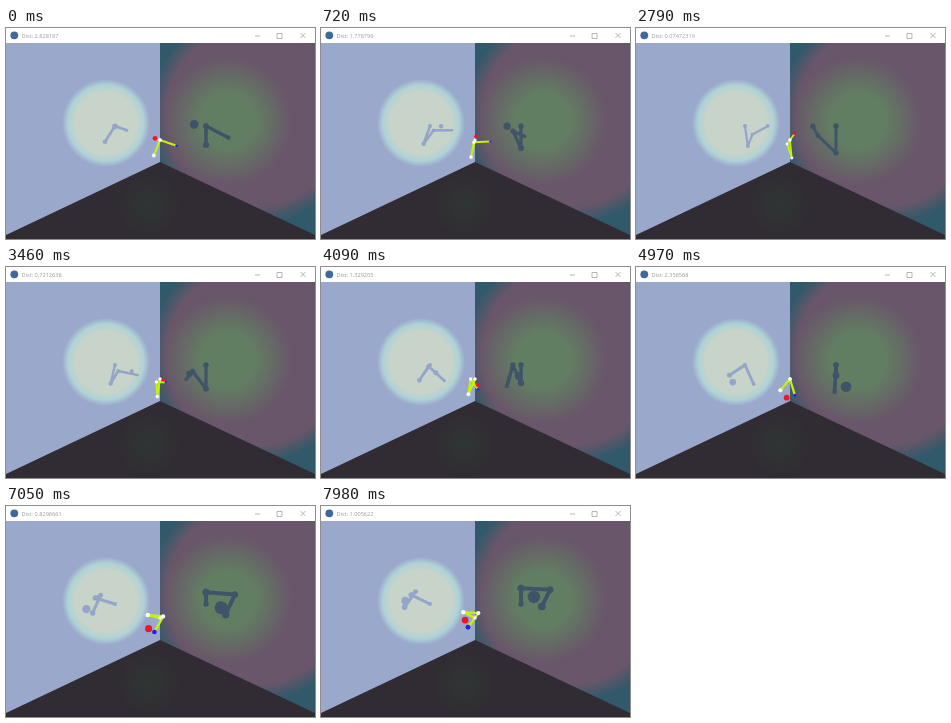
An HTML page for the animation above (8000 ms loop, 309 by 211 pixels).

```html
<!DOCTYPE html>
<html lang="en">
<head>
<meta charset="utf-8">
<title>Arm reaching a target</title>
<style>
  html, body { margin: 0; width: 100%; height: 100%; overflow: hidden; background: #fff; }
  svg { display: block; width: 100vw; height: 100vh; }
  text { font: 5.6px "Open Sans", sans-serif; fill: #999; }
  polyline { fill: none; stroke-linejoin: round; }
</style>
</head>
<body>
<svg viewBox="0 0 309 211">
  <defs>
    <radialGradient id="spot" gradientUnits="userSpaceOnUse" cx="100" cy="95" r="44">
      <stop offset=".7" stop-color="#c8d3ca"/>
      <stop offset=".86" stop-color="#aed3d5"/>
      <stop offset="1" stop-color="#9aa8cc"/>
    </radialGradient>
    <radialGradient id="mauve" gradientUnits="userSpaceOnUse" cx="250" cy="88" r="112">
      <stop offset=".8" stop-color="#69566a"/>
      <stop offset=".96" stop-color="#30596a"/>
    </radialGradient>
    <radialGradient id="green" gradientUnits="userSpaceOnUse" cx="222" cy="93" r="64">
      <stop offset=".42" stop-color="#627e62"/>
      <stop offset="1" stop-color="#627e62" stop-opacity="0"/>
    </radialGradient>
    <radialGradient id="glow" gradientUnits="userSpaceOnUse" cx="143" cy="177" r="34">
      <stop offset="0" stop-color="#2f3632"/>
      <stop offset="1" stop-color="#312b34"/>
    </radialGradient>
  </defs>
  <path fill="url(#spot)" d="M0 15H154V211H0z"/>
  <path fill="url(#mauve)" d="M154 15H309V211H154z"/>
  <path fill="url(#green)" d="M154 15H309V211H154z"/>
  <path fill="url(#glow)" d="M0 207L154 134L309 207V211H0z"/>
  <g id="scene"></g>
  <path fill="#fff" d="M0 0H309V15H0z"/>
  <circle cx="8.3" cy="7.3" r="3.9" fill="#3f689c"/>
  <text id="dist" x="15.5" y="9.7"></text>
  <path fill="none" stroke="#999" stroke-width=".7"
    d="M249 8H254M271 5.5h5v5h-5zM294.5 5l5 5m0-5l-5 5"/>
</svg>
<script>
const LOOP = 8000;
const HOLDS = [[780, 870], [1620, 1710], [3240, 3360]];

// Key angles in degrees: yaw turns from the left wall to the right, pitch is downward.
const keyTimes = [0, 1530, 2790, 4090, 4970, 6110, 7980];
const distance = [2.828187, 0.5982321, 0.07472319, 1.329205, 2.358568, 0.6518182, 1.005622];
const bones = [
  { yaw: [180, 180, 180, 180, 180, 180, 180], pitch: [60, 84, 98, 58, 39, 0, -19] },
  { yaw: [0, -60, -69, -31, 0, 72, 77], pitch: [-60, -50, -50, -58, -39, 6, 3] },
  { yaw: [52, -9, -12, -14, -6, 48, 27], pitch: [19, -26, -36, 35, 64, 112, 128] }
];
const reach = { yaw: [-117, -150, -180, -223, -200, -227, -82], pitch: [-18, -20, -20, -23, 7, 0, -56] };

// Each view projects a point: left and right run along the walls, down is vertical.
const shadow = (color, width, joint, ball, project) =>
  ({ line: color, width, joint, ball, project, dots: Array(5).fill(color) });
const views = [
  shadow("#94a5c8", 2.3, 2, 2.8, ([left, right, down]) =>
    [109 + left, 98 + 1.1 * down + .14 * left - .17 * right]),
  shadow("#3f5468", 3, 2.7, 4.4, ([left, right, down]) =>
    [200 + right, 98 + 1.45 * down + .38 * left - .06 * right]),
  { line: "#c4f20a", width: 1.8, joint: 1.7, ball: 2.4,
    dots: ["#fff", "#fff", "#fff", "#2222e8", "#f0142c"],
    project: ([left, right, down]) => [154 + .62 * left + .42 * right, 112 + down] }
];

const add = (name, attributes) => {
  const node = document.createElementNS("http://www.w3.org/2000/svg", name);
  set(node, attributes);
  return document.getElementById("scene").appendChild(node);
};
const set = (node, attributes) => {
  for (const key in attributes) node.setAttribute(key, attributes[key]);
};
for (const view of views) {
  view.path = add("polyline", { stroke: view.line });
  view.circles = view.dots.map(fill => add("circle", { fill }));
}

function sample(track, time) {
  const next = Math.max(1, keyTimes.findIndex(key => key >= time));
  const from = keyTimes[next - 1], to = keyTimes[next];
  return track[next - 1] + (track[next] - track[next - 1]) * (time - from) / (to - from);
}

function extend([left, right, down], bone, length, time) {
  const yaw = sample(bone.yaw, time) * Math.PI / 180;
  const pitch = sample(bone.pitch, time) * Math.PI / 180;
  return [
    left + 20 * length * Math.cos(pitch) * Math.cos(yaw),
    right + 30 * length * Math.cos(pitch) * Math.sin(yaw),
    down + 18 * length * Math.sin(pitch)
  ];
}

// Things further out from the right wall look larger.
const closeness = ([left]) => 1 - left / 60;

function draw(now) {
  let time = Math.min(Math.floor(now % LOOP / 10) * 10, keyTimes.at(-1));
  for (const [from, to] of HOLDS) if (time > from && time <= to) time = from;

  const dist = sample(distance, time);
  const points = [[0, 0, 0]];
  for (const bone of bones) points.push(extend(points.at(-1), bone, 1, time));
  points.push(extend(points.at(-1), reach, dist / 2.1, time));

  for (const view of views) {
    const spots = points.map(view.project);
    set(view.path, {
      points: spots.slice(0, 4).join(" "),
      "stroke-width": view.width * closeness(points[1])
    });
    view.circles.forEach((circle, i) => set(circle, {
      cx: spots[i][0],
      cy: spots[i][1],
      r: (i < 4 ? view.joint : view.ball) * closeness(points[i])
    }));
  }
  document.getElementById("dist").textContent = "Dist: " + Number(dist.toPrecision(7));
}

const start = performance.now();
function tick() {
  draw(performance.now() - start);
  requestAnimationFrame(tick);
}
tick();
</script>
</body>
</html>
```
